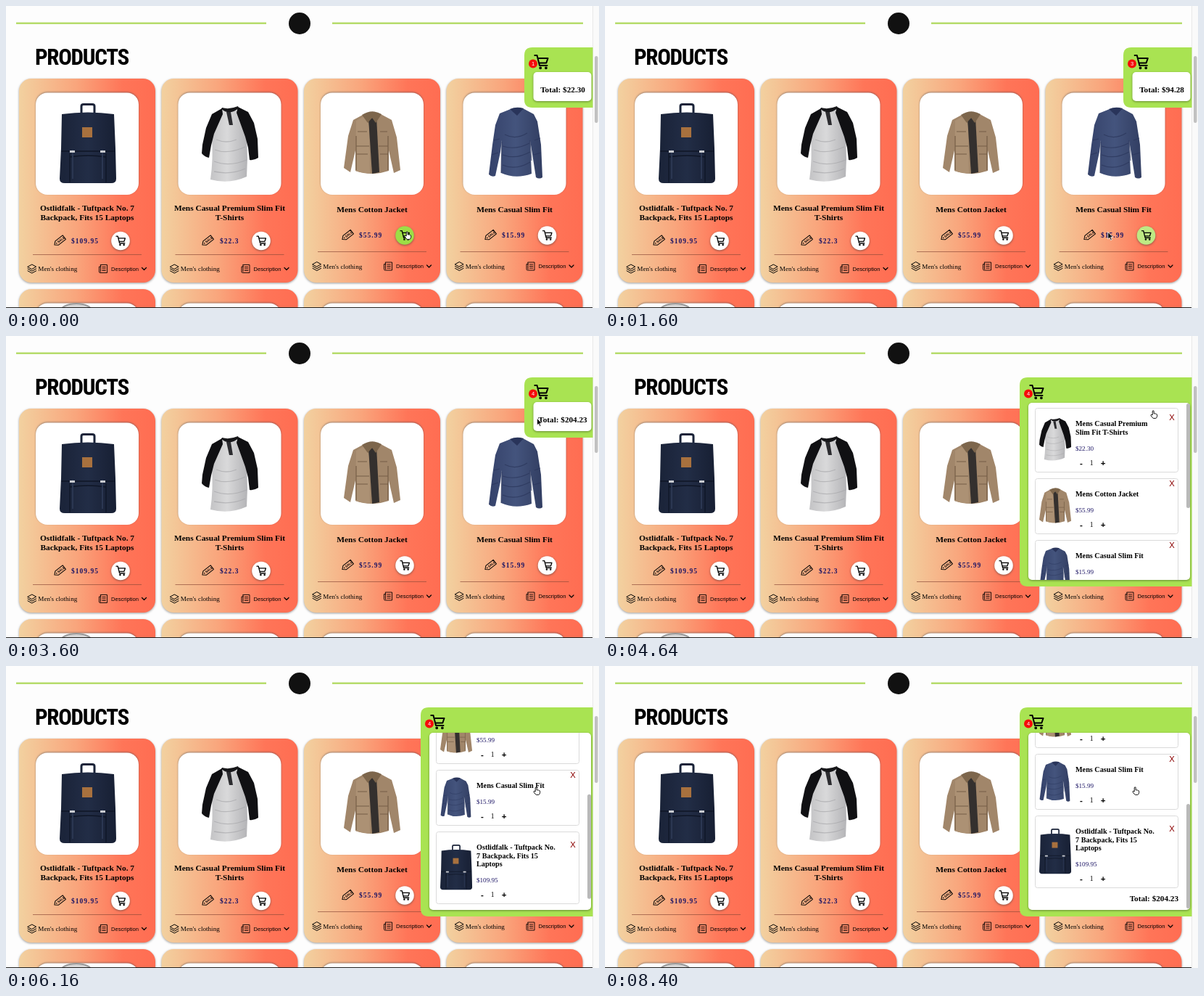
An HTML page for the animation above (8480 ms loop, 818x416 px).

```html
<!DOCTYPE html>
<html lang="en">
<head>
<meta charset="utf-8">
<title>Shop cart</title>
<style>
  html, body { margin: 0; width: 100%; height: 100%; overflow: hidden; background: #fdfdfd; }
  svg { display: block; width: 818px; height: 416px; }
  text { font-family: "Liberation Serif", "Times New Roman", serif; }
  .sans { font-family: "Liberation Sans", Arial, sans-serif; }
  .head { font: 900 31px "Roboto Condensed", Roboto, "Open Sans", sans-serif; font-stretch: 75%; letter-spacing: -1.3px; }
  .title { font-weight: bold; font-size: 11.4px; text-anchor: middle; }
  .price { font-weight: bold; font-size: 9.5px; letter-spacing: 1px; fill: #1b1464; }
  .item { font-weight: bold; font-size: 10.2px; }
  .total { font-weight: bold; font-size: 11.2px; }
  .card { filter: drop-shadow(0 1px 1.5px rgba(0,0,0,.38)); }
  .photo { filter: drop-shadow(0 -1px 1px rgba(70,70,80,.5)); }
  .round { filter: drop-shadow(0 1px 1.5px rgba(60,60,60,.6)); }
  .sheet { filter: drop-shadow(0 1.5px 1.5px rgba(0,0,0,.4)); }
  .line { fill: none; stroke: #000; stroke-linejoin: round; stroke-linecap: round; }
</style>
</head>
<body>
<svg id="stage" viewBox="0 0 818 416" xmlns="http://www.w3.org/2000/svg">
  <defs>
    <linearGradient id="warm">
      <stop offset="0" stop-color="#f2d1a0"/><stop offset=".42" stop-color="#f9a57c"/>
      <stop offset=".76" stop-color="#ff7558"/><stop offset="1" stop-color="#ff6d52"/>
    </linearGradient>
    <linearGradient id="navy"><stop offset="0" stop-color="#1a2338"/><stop offset=".5" stop-color="#222d46"/><stop offset="1" stop-color="#171f33"/></linearGradient>
    <linearGradient id="grey"><stop offset="0" stop-color="#c3c3c5"/><stop offset=".45" stop-color="#d9d9da"/><stop offset="1" stop-color="#b4b4b7"/></linearGradient>
    <linearGradient id="blue"><stop offset="0" stop-color="#35426a"/><stop offset=".5" stop-color="#44547d"/><stop offset="1" stop-color="#323e62"/></linearGradient>
    <clipPath id="window"><rect x="584" y="92" width="223" height="244" rx="5"/></clipPath>

    <g id="cart" class="line" stroke-width="2">
      <path d="M.8 1H4L7.5 15H18M5 5H19L16.8 11.5H6.6"/>
      <circle cx="8.7" cy="18.3" r=".9"/><circle cx="16.4" cy="18.3" r=".9"/>
    </g>
    <g id="tag" transform="rotate(-38 8 8)">
      <path class="line" stroke-width="1" d="M-1 8L3 4.5H16V11.5H3Z"/>
      <circle cx="2.6" cy="8" r=".8"/>
      <text class="sans" x="4.6" y="9.6" font-size="4.4" font-weight="bold">SALE</text>
    </g>
    <path id="layers" class="line" d="M0 3.2L5.8 0L11.6 3.2L5.8 6.4ZM0 6L5.8 9.2L11.6 6M0 8.8L5.8 12L11.6 8.8"/>
    <path id="note" class="line" stroke-width=".9" d="M2.5 .5H11.5V11.5H2Q.5 11.5 .5 10V3H2.5ZM2.5 3V10M4.8 3.5H9.3M4.8 6H9.3M4.8 8.5H9.3"/>

    <g id="pack">
      <path d="M30 14V4Q30 1.5 33 1.5H45Q48 1.5 48 4V14" fill="none" stroke="#1a2338" stroke-width="3"/>
      <path d="M3 15Q39 10 75 15L77 62L78 104Q78 110 71 110H7Q0 110 0 104L2 62Z" fill="url(#navy)"/>
      <path d="M2 66H76M14 69V109M64 69V109M14 74Q39 70 64 74" fill="none" stroke="#0f1626" stroke-width="1.3"/>
      <path d="M18 64V104M59 64V104" stroke="#2b3752" stroke-width="2"/>
      <path d="M14 66.5H21M56 66.5H63" stroke="#c9cbd0" stroke-width="3"/>
      <rect x="31" y="33" width="14" height="14" fill="#a8713e"/>
    </g>
    <g id="tee">
      <path d="M26 6H52L62 40L63 72L62 97Q38 108 12 101Q16 74 14 44Z" fill="url(#grey)"/>
      <path d="M28 3L14 11L6 30L1 53L0 65Q4 70 10 71L13 54L17 38L29 11Z" fill="#101013"/>
      <path d="M50 1L64 8L72 23L77 45L78 71Q72 75 66 74L64 57L60 42L48 9Z" fill="#101013"/>
      <path d="M27 4Q38 13 51 3L50 0Q38 5 28 2Z" fill="#17171a"/>
      <path d="M34 8H40L43 26H38Z" fill="#2c2c30"/>
      <path d="M18 60Q36 67 60 56M17 76Q38 84 62 74M20 46Q34 52 48 46M17 90Q40 95 60 86" fill="none" stroke="#a2a2a5" stroke-width="1.3" opacity=".6"/>
    </g>
    <g id="coat">
      <path d="M26 5L13 12L6 34L0 78L9 84L16 54L16 82Q38 90 62 82L62 54L69 85L78 81L73 36L66 12L51 4L39 10Z" fill="#a1866a"/>
      <path d="M17 13L28 7L35 18L36 85Q26 86 16 82Z" fill="#ac9174"/>
      <path d="M34 10L45 8L49 84L39 86Z" fill="#34302e"/>
      <path d="M25 5Q39 -4 52 4L44 16L39 9L33 16Z" fill="#7d664c"/>
      <path d="M19 28H32M50 28H60M18 59H33M50 59H61M17 48H35M48 48H61M17 34V81M61 34V81" fill="none" stroke="#765e46" stroke-width="1.2"/>
    </g>
    <g id="top">
      <path d="M31 3L16 9L10 25L6 52L1 93Q5 97 10 95L17 62L19 46L18 91Q38 100 60 92L58 46L66 97Q71 100 75 97L73 52L68 20L63 10L48 2Q39 8 31 3Z" fill="url(#blue)"/>
      <path d="M30 3Q39 -1 49 2L40 12Z" fill="#29345a"/>
      <path d="M19 48L18 91M58 46L60 74M23 38Q38 46 54 36M20 54Q38 60 57 50M20 66Q38 73 58 62M20 80Q38 88 58 76M5 66L14 63M63 66L73 63M8 46L16 44M64 46L72 43" fill="none" stroke="#2a365b" stroke-width="1.2" opacity=".7"/>
    </g>
    <path id="hand" d="M-1.8 1V-4Q-1.8 -5.2 -.8 -5.2T.2 -4V-1Q1 -1.8 1.8 -.9Q2.7 -1.4 3.3 -.5Q4.6 -.7 4.6 .7V2.4Q4.4 4.8 2.8 5.4H-.7Q-1.8 4.8 -4 1.5Q-4.2 .2 -3 .2Z" fill="#fff" stroke="#111" stroke-width="1"/>
    <path id="arrow" d="M-3 -5V5L-.8 3L1 6.5L2.6 5.7L1 2.4H4Z" fill="#111" stroke="#fff" stroke-width=".8"/>
  </defs>

  <rect width="818" height="416" fill="#fdfdfd"/>
  <path d="M14 23.7H359M450 23.7H796" stroke="#b6dc6b" stroke-width="2.4"/>
  <circle cx="405" cy="24" r="15" fill="#111"/>
  <text class="head" x="40" y="81">PRODUCTS</text>
  <g id="cards"></g>
  <path d="M0 415.5H809" stroke="#222"/>
  <path d="M809.5 0V416" stroke="#e8e8e8"/>
  <rect x="810" width="8" height="416" fill="#fafafa"/>
  <rect x="812" y="69" width="4.5" height="92" rx="2.2" fill="#c1c1c1"/>

  <g id="small">
    <path d="M809.5 57H726Q715 57 715 68V129Q715 140 726 140H809.5Z" fill="#a9e352"/>
    <rect class="sheet" x="727.5" y="91" width="80" height="40" rx="5" fill="#fff"/>
    <text id="sum" class="total" x="768" y="119" text-anchor="middle"></text>
  </g>
  <g id="large">
    <path d="M809.5 57H583Q572 57 572 68V334Q572 345 583 345H809.5Z" fill="#a9e352"/>
    <rect class="sheet" x="584" y="92" width="223" height="244" rx="5" fill="#fff"/>
    <g clip-path="url(#window)"><g id="list"></g></g>
    <rect id="thumb" x="802" y="93" width="5" height="144" rx="2.5" fill="#b9b9b9"/>
  </g>
  <g id="badge">
    <use id="bigcart" href="#cart"/>
    <circle cx="727" cy="79.5" r="6" fill="#f50a0a"/>
    <text id="count" class="sans" x="727" y="82.3" font-size="7.5" fill="#fff" text-anchor="middle"></text>
  </g>
  <use id="pointer"/>
</svg>

<script>
const LOOP = 8480, STEP = 80;
const $ = id => document.getElementById(id);

const goods = [
  { x: 18, art: 'pack', at: [74, 134], lines: ['Ostlidfalk - Tuftpack No. 7', 'Backpack, Fits 15 Laptops'], price: '$109.95', tag: 66, cost: 90, btn: [158, 323.5] },
  { x: 214.5, art: 'tee', at: [270, 138], lines: ['Mens Casual Premium Slim Fit', 'T-Shirts'], price: '$22.3', tag: 270, cost: 295, btn: [352, 323.5] },
  { x: 411, art: 'coat', at: [466, 145], lines: ['Mens Cotton Jacket'], price: '$55.99', tag: 463, cost: 487, btn: [550, 316] },
  { x: 607.5, art: 'top', at: [665, 139], lines: ['Mens Casual Slim Fit'], price: '$15.99', tag: 660, cost: 684, btn: [746.5, 316] }
];
const items = [
  { y: 99, h: 88, art: 'tee', top: 113, cross: 112, lines: ['Mens Casual Premium', 'Slim Fit T-Shirts'], price: '$22.30' },
  { y: 196, h: 76, art: 'coat', top: 209, cross: 203, lines: ['Mens Cotton Jacket'], price: '$55.99' },
  { y: 281, h: 76, art: 'top', top: 291, cross: 288, lines: ['Mens Casual Slim Fit'], price: '$15.99' },
  { y: 366, h: 99, art: 'pack', top: 384, cross: 384, lines: ['Ostlidfalk - Tuftpack No.', '7 Backpack, Fits 15', 'Laptops'], price: '$109.95' }
];

const use = (id, x, y, s = 1) => `<use href="#${id}" transform="translate(${x} ${y}) scale(${s})"/>`;
const text = (cls, x, y, str, more = '') => `<text class="${cls}" x="${x}" y="${y}" ${more}>${str}</text>`;
const frame = (x, y) =>
  `<rect class="card" x="${x}" y="${y}" width="188" height="281" rx="17" fill="url(#warm)"/>
   <rect class="photo" x="${x + 23}" y="${y + 19.5}" width="142" height="140.5" rx="16" fill="#fff"/>`;

function card(g, i) {
  const two = g.lines.length > 1, mid = g.x + 94;
  const [bx, by] = g.btn, foot = two ? 362 : 358.5, rule = two ? 342.5 : 338.5;
  return frame(g.x, 100) + use(g.art, ...g.at) +
    g.lines.map((s, n) => text('title', mid, (two ? 282 : 284) + n * 13, s)).join('') +
    use('tag', g.tag, by - 8) + text('price', g.cost, by + 3.2, g.price) +
    `<circle class="round" id="btn${i}" cx="${bx}" cy="${by}" r="12.8"/>` +
    use('cart', bx - 6.5, by - 7, .68) +
    `<path d="M${g.x + 19} ${rule}H${g.x + 169}" stroke="#8d4a38" stroke-width=".9" opacity=".75"/>` +
    use('layers', g.x + 12, foot - 6) + text('', g.x + 26.3, foot + 3.2, "Men's clothing", 'font-size="9.1"') +
    use('note', g.x + 110, foot - 6) + text('sans', g.x + 127, foot + 2.7, 'Description', 'font-size="7.6"') +
    `<path class="line" stroke-width="1.2" d="M${g.x + 169.5} ${foot - 1.5}l3 3l3 -3"/>` +
    frame(g.x, 390);
}

function row(r) {
  const end = r.y + r.h;
  const mark = (x, s) => text('sans', x, end - 8.2, s, 'font-size="11.5" font-weight="bold" text-anchor="middle"');
  return `<rect x="593.5" y="${r.y + .5}" width="197" height="${r.h}" rx="3" fill="#fff" stroke="#dadada"/>` +
    use(r.art, 599, r.top, .565) +
    r.lines.map((s, n) => text('item', 649, r.y + 25.2 + n * 11.6, s)).join('') +
    text('', 649, end - 29.5, r.price, 'font-size="9.1" fill="#1b1464"') +
    mark(657, '-') + mark(687, '+') +
    text('', 671, end - 8.7, '1', 'font-size="9.5" text-anchor="middle"') +
    text('sans', 782, r.cross + 4, 'X', 'font-size="11.2" fill="#8b0000" text-anchor="middle"');
}

$('cards').innerHTML = goods.map(card).join('') +
  '<ellipse cx="97" cy="419" rx="22" ry="10" fill="#9a9a9a"/><ellipse cx="97" cy="420" rx="20" ry="9" fill="#d4d4d4"/>';
$('list').innerHTML = items.map(row).join('') +
  text('total', 791, 484, 'Total: $204.23', 'text-anchor="end"');

// Rows of [time, ...values], eased between neighbours.
const path = [[0, 554, 316], [240, 554, 316], [640, 743, 308], [720, 743, 308], [880, 748, 315], [1440, 748, 315],
  [2320, 159, 328], [2880, 159, 328], [3680, 752, 112], [4400, 757, 108], [4720, 757, 108], [5120, 732, 172]];
const scroll = [[0, 0], [4960, 0], [5680, 160], [5920, 160], [6160, 138], [6880, 0], [7520, 0], [8320, 160]];
const sums = [[0, '$22.30'], [240, '$78.29'], [1040, '$94.28'], [2720, '$204.23']];
const OPEN = 3680, FADE = 240;

function ease(rows, t) {
  const n = rows.findIndex(r => r[0] > t);
  if (n < 0) return rows[rows.length - 1].slice(1);
  const a = rows[n - 1] || rows[0], b = rows[n];
  const p = Math.max(0, (t - a[0]) / (b[0] - a[0])), k = p * p * (3 - 2 * p);
  return a.slice(1).map((v, j) => v + (b[j + 1] - v) * k);
}

function over(i, t) {
  const [x, y] = ease(path, Math.max(0, t)), [bx, by] = goods[i].btn;
  return Math.hypot(x - bx, y - by) < 14;
}

// Share of the recent past spent over a button: a linear fade in and out.
function glow(i, t) {
  let hits = 0;
  for (let n = 0; n < 12; n++) hits += over(i, t - n * FADE / 12);
  return hits / 12;
}

function shake(dt) {
  return dt > 0 && dt < 768 ? 5 * Math.sin(2 * Math.PI * dt / 384) : 0;
}

function draw(now) {
  const t = Math.floor(now % LOOP / STEP) * STEP;
  const open = t >= OPEN;
  const n = sums.filter(s => s[0] <= t).length;
  const [x, y] = ease(path, t), [top] = ease(scroll, t);

  goods.forEach((g, i) => {
    const k = glow(i, t), mix = (a, b) => Math.round(a + (b - a) * k);
    $('btn' + i).setAttribute('fill', `rgb(${mix(255, 157)},${mix(255, 222)},${mix(255, 70)})`);
  });

  $('sum').textContent = 'Total: ' + sums[n - 1][1];
  $('count').textContent = n;
  $('small').setAttribute('display', open ? 'none' : 'inline');
  $('large').setAttribute('display', open ? 'inline' : 'none');
  $('badge').setAttribute('transform', `translate(${open ? -143 : 0} 0)`);
  const dx = n > 1 ? shake(t - sums[n - 1][0]) : 0;
  $('bigcart').setAttribute('transform', `translate(${728.5 + dx} 67)`);
  $('list').setAttribute('transform', `translate(0 ${-top})`);
  $('thumb').setAttribute('y', 93 + top * 97 / 160);

  const hand = open || goods.some((g, i) => over(i, t));
  $('pointer').setAttribute('href', hand ? '#hand' : '#arrow');
  $('pointer').setAttribute('transform', `translate(${x} ${y})`);
}

const start = performance.now();
function tick() {
  draw(performance.now() - start);
  requestAnimationFrame(tick);
}
tick();
</script>
</body>
</html>
```
